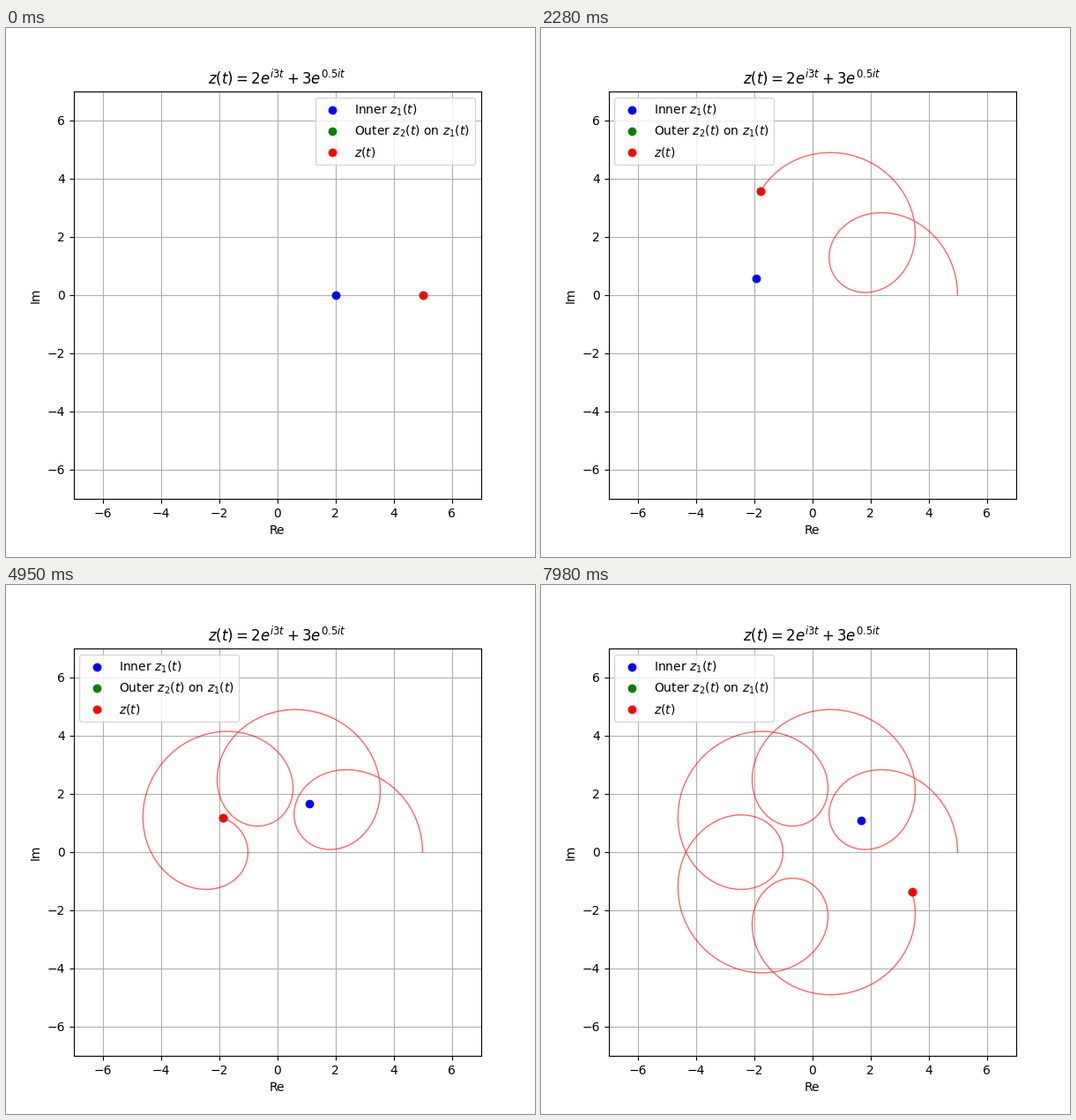
Animation, 600 px wide and 600 px high, one loop 8 s. Source, as a matplotlib script:

```python
import numpy as np
import matplotlib.pyplot as plt
from matplotlib.animation import FuncAnimation

LOOP_MS = 8000
FRAMES = 267

t = np.linspace(0, 20, 500)[:FRAMES]
inner = 2 * np.exp(3j * t)
z = inner + 3 * np.exp(0.5j * t)

fig, ax = plt.subplots(figsize=(6, 6), dpi=100)
ax.set_xlim(-7, 7)
ax.set_ylim(-7, 7)
ax.set_aspect("equal")
ax.grid(True)
ax.set_title(r"$z(t) = 2e^{i3t} + 3e^{0.5it}$")
ax.set_xlabel("Re")
ax.set_ylabel("Im")

inner_dot, = ax.plot([], [], "bo", label="Inner $z_1(t)$")
outer_dot, = ax.plot([], [], "go", label="Outer $z_2(t)$ on $z_1(t)$")
sum_dot, = ax.plot([], [], "ro", label="$z(t)$")
trail, = ax.plot([], [], "r-", lw=1, alpha=0.6)

# "best" lets the legend jump aside once the trail runs under it
ax.legend(loc="best")


def place(line, points):
    line.set_data(points.real, points.imag)


def update(i):
    now = slice(i, i + 1)
    place(inner_dot, inner[now])
    place(outer_dot, z[now])
    place(sum_dot, z[now])
    place(trail, z[:i + 1])
    return inner_dot, outer_dot, sum_dot, trail


anim = FuncAnimation(fig, update, frames=FRAMES, interval=LOOP_MS / FRAMES,
                     repeat=True, repeat_delay=0, blit=False)
plt.show()
```
